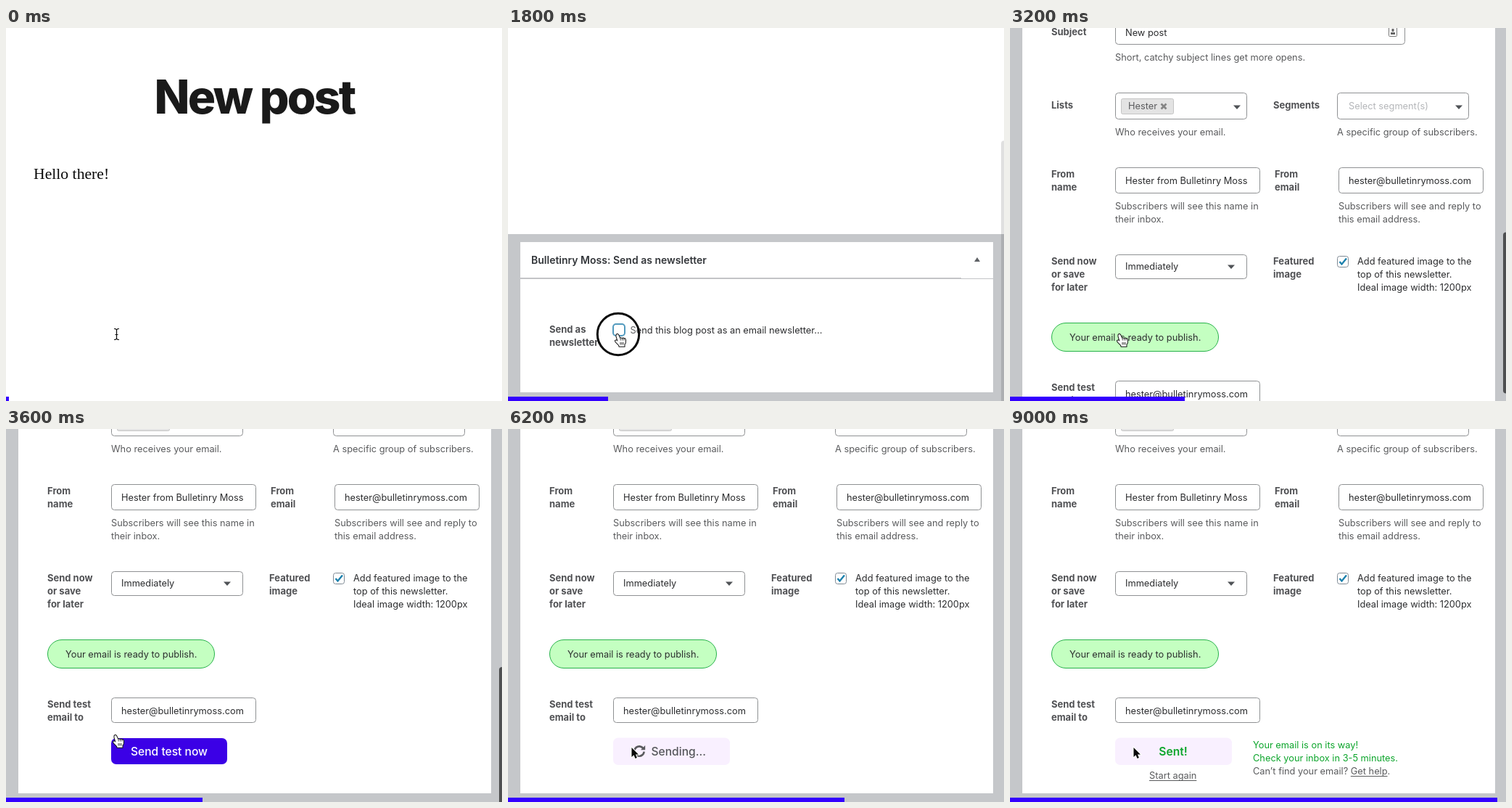
Animation of 684x514 px, one loop 9200 ms. Source, as an HTML page with a canvas:

```html
<!DOCTYPE html>
<html lang="en">
<head>
<meta charset="utf-8">
<title>Send as newsletter</title>
<style>
  html, body { margin: 0; width: 100%; height: 100%; overflow: hidden; background: #fff; }
  canvas { display: block; width: 684px; height: 514px; }
</style>
</head>
<body>
<canvas id="stage" width="684" height="514"></canvas>
<script>
const ctx = document.getElementById('stage').getContext('2d');
const W = 684, H = 514, LOOP = 9200, STEP = 200, END_SCROLL = 845;
const CHECKED_AT = 2000, SENDING_AT = 5000, SENT_AT = 7600;

const SANS = 'Inter, sans-serif';
const BODY = `400 12.8px ${SANS}`;
const LABEL = `700 13px ${SANS}`;
const BUTTON = `500 15.6px ${SANS}`;
const INK = '#2c2d2f', MUTED = '#5a5b5d', BORDER = '#8f9193', GREEN = '#0ca52b', BLUE = '#3b00e6';

const BRAND = 'Bulletinry Moss', SENDER = 'Hester', EMAIL = 'hester@bulletinrymoss.com';

const clamp = v => Math.max(0, Math.min(1, v));
const ramp = (t, from, to) => clamp((t - from) / (to - from));
const smooth = p => p * p * (3 - 2 * p);

function keyed(t, keys) {
  for (let i = 1; i < keys.length; i++) {
    const [t0, v0] = keys[i - 1], [t1, v1] = keys[i];
    if (t <= t1) return v0 + (v1 - v0) * ramp(t, t0, t1);
  }
  return keys[keys.length - 1][1];
}

function scrollAt(t) {
  if (t < CHECKED_AT) return Math.round(235 * smooth(ramp(t, 363, 1085)));
  return Math.round(keyed(t, [[2200, 235], [2400, 425], [2800, 575], [3500, END_SCROLL]]));
}

function text(str, x, y, color = INK, font = BODY, align = 'left') {
  ctx.font = font;
  ctx.fillStyle = color;
  ctx.textAlign = align;
  ctx.fillText(str, x, y);
}

function lines(list, x, y, color, font) {
  list.forEach((str, i) => text(str, x, y + i * 18, color, font));
}

const label = (list, x, y) => lines(list, x, y, '#505154', LABEL);
const hint = (list, x, y) => lines(list, x, y, MUTED);

function box(x, y, w, h, r, fill, stroke, line = 1) {
  ctx.beginPath();
  ctx.roundRect(x, y, w, h, r);
  if (fill) { ctx.fillStyle = fill; ctx.fill(); }
  if (stroke) { ctx.strokeStyle = stroke; ctx.lineWidth = line; ctx.stroke(); }
}

function shape(points, fill, stroke, line = 1) {
  ctx.beginPath();
  points.forEach(([x, y]) => ctx.lineTo(x, y));
  ctx.closePath();
  if (stroke) { ctx.strokeStyle = stroke; ctx.lineWidth = line; ctx.stroke(); }
  ctx.fillStyle = fill;
  ctx.fill();
}

function stroke(points, color, line) {
  ctx.beginPath();
  points.forEach(([x, y]) => ctx.lineTo(x, y));
  ctx.strokeStyle = color;
  ctx.lineWidth = line;
  ctx.stroke();
}

const field = (x, y, w, h) => box(x + .5, y + .5, w - 1, h - 1, 4, '#fff', BORDER);
const caret = (x, y) => shape([[x - 5, y - 2.5], [x + 5, y - 2.5], [x, y + 3]], '#505357');

function underlined(str, x, y) {
  text(str, x, y, MUTED);
  ctx.fillRect(x, y + 2, ctx.measureText(str).width, 1);
}

function checkbox(x, y, size, focused, checked) {
  const half = size / 2;
  box(x - half, y - half, size, size, focused ? 4 : 3, '#fff', focused ? '#1878a8' : '#7e8993', focused ? 2 : 1);
  if (checked) stroke([[x - 4.5, y], [x - 1.5, y + 3.5], [x + 5, y - 4.5]], '#1c81ad', 2.4);
}

function drawPost() {
  ctx.letterSpacing = '-2.66px';
  text('New post', 342.5, -727, '#1a1a1a', `800 64px ${SANS}`, 'center');
  ctx.letterSpacing = '0px';
  text('Hello there!', 38, -637, '#0a0a0a', '21.7px "Liberation Serif", serif');
}

function drawPanel(open) {
  ctx.fillStyle = '#c5c7ca';
  ctx.fillRect(0, -326, W, 1400);
  ctx.fillStyle = '#fff';
  ctx.fillRect(17, -315, 652, (open ? 502 : -108) + 315);
  text(`${BRAND}: Send as newsletter`, 32, -285, '#33363a', `600 14px ${SANS}`);
  shape([[643, -288], [651, -288], [647, -294]], '#5f6266');
  ctx.fillStyle = '#c3c4c7';
  ctx.fillRect(17, -265, 652, 1);
  ctx.fillRect(17, -266, 608, 1);
  label(['Send as', 'newsletter'], 57, -190);
  checkbox(153, -194, 16, true, open);
  text('Send this blog post as an email newsletter...', 168.5, -189);
}

function drawForm() {
  label(['Subject'], 57, -106);
  field(145, -128, 400, 35);
  text('New post', 159, -105);
  box(522.5, -117.5, 11, 13, 1, '#fff', '#777');
  ctx.fillStyle = '#666';
  ctx.fillRect(526.5, -115, 3, 4);
  ctx.fillRect(525, -110, 6, 3);
  hint(['Short, catchy subject lines get more opens.'], 145, -71);

  label(['Lists'], 57, -5);
  field(145, -27, 182, 37);
  box(153.5, -18.5, 72, 21, 2, '#e3e3e3', '#c4c4c4');
  text(SENDER, 163, -4, MUTED);
  stroke([[208.5, -11.5], [215.5, -4.5]], '#858585', 2.6);
  stroke([[215.5, -11.5], [208.5, -4.5]], '#858585', 2.6);
  caret(313, -7);
  hint(['Who receives your email.'], 145, 32);

  label(['Segments'], 363, -5);
  field(451, -27, 182, 37);
  text('Select segment(s)', 467, -4, '#b4b6b9');
  caret(619, -7);
  hint(['A specific group of subscribers.'], 451, 32);

  label(['From', 'name'], 57, 90);
  field(145, 76, 200, 36);
  text(`${SENDER} from ${BRAND}`, 159, 99);
  hint(['Subscribers will see this name in', 'their inbox.'], 145, 134);

  label(['From', 'email'], 365, 90);
  field(453, 76, 200, 36);
  text(EMAIL, 467, 99);
  hint(['Subscribers will see and reply to', 'this email address.'], 453, 134);

  label(['Send now', 'or save', 'for later'], 57, 210);
  field(145, 196, 182, 34);
  text('Immediately', 159, 217);
  caret(305, 213);

  label(['Featured', 'image'], 363, 210);
  checkbox(459, 206, 15, false, true);
  lines(['Add featured image to the', 'top of this newsletter.', 'Ideal image width: 1200px'], 479, 210);

  box(57.5, 290.5, 230, 39, 19.5, '#c4ffc1', '#27b24a');
  text('Your email is ready to publish.', 82, 315);

  label(['Send test', 'email to'], 57, 384);
  field(145, 370, 200, 35);
  text(EMAIL, 159, 393);
}

function drawSpinner(x, y, angle) {
  ctx.save();
  ctx.translate(x, y);
  ctx.rotate(angle);
  for (let i = 0; i < 2; i++) {
    ctx.beginPath();
    ctx.arc(0, 0, 6.7, Math.PI * 1.03, Math.PI * 1.8);
    ctx.strokeStyle = '#5a5a5e';
    ctx.lineWidth = 2.7;
    ctx.stroke();
    shape([[8.2, -8], [8.2, -1.8], [2, -1.8]], '#5a5a5e');
    ctx.rotate(Math.PI);
  }
  ctx.restore();
}

function drawButton(t) {
  if (t < SENDING_AT) {
    box(145, 426, 160, 36, 7, BLUE);
    text('Send test now', 225, 450, '#fff', BUTTON, 'center');
    return;
  }
  box(145, 425.5, 161, 37.5, 7, '#f9f0ff');
  if (t < SENT_AT) {
    drawSpinner(181, 444, (t - 6200) / 2000 * Math.PI * 2);
    text('Sending...', 197.5, 450, '#55565a', BUTTON);
    return;
  }
  text('Sent!', 225, 450, GREEN, `600 15.6px ${SANS}`, 'center');
  underlined('Start again', 192, 482);
  lines(['Your email is on its way!', 'Check your inbox in 3-5 minutes.'], 335, 440, GREEN);
  const question = 'Can’t find your email? ';
  text(question, 335, 476, MUTED);
  const linkX = 335 + ctx.measureText(question).width;
  underlined('Get help', linkX, 476);
  text('.', linkX + ctx.measureText('Get help').width, 476, MUTED);
}

function drawScrollbar(t, scroll, open) {
  const alpha = keyed(t, [[350, 0], [400, .6], [1400, .6], [1900, 0], [2150, 0], [2200, .6], [3900, .6], [4400, 0]]);
  if (!alpha) return;
  const top = open ? scroll * .4 - 10 : scroll * .716 - 13;
  box(680, top, 8, open ? 222 : 396, 4, `rgba(0,0,0,${alpha})`);
}

function drawRing(x, y) {
  ctx.beginPath();
  ctx.arc(x, y, 28.7, 0, Math.PI * 2);
  ctx.fillStyle = 'rgba(255,255,255,.25)';
  ctx.fill();
  ctx.strokeStyle = '#0a0a0a';
  ctx.lineWidth = 3;
  ctx.stroke();
}

function drawIBeam() {
  stroke([[149, 414.5], [151, 414.5], [152.5, 416], [154, 414.5], [156, 414.5]], '#111', 1.2);
  stroke([[149, 429.5], [151, 429.5], [152.5, 428], [154, 429.5], [156, 429.5]], '#111', 1.2);
  stroke([[152.5, 416], [152.5, 428]], '#111', 1.3);
  stroke([[150.5, 422.5], [154.5, 422.5]], '#111', 1);
}

function drawHand() {
  const outline = [[-2.5, 1], [-1.5, 0], [0, .5], [2.5, 6], [4, 5.3], [5.3, 6.2], [6.8, 5.4],
    [8, 6.4], [9.2, 6.1], [10, 8], [9.8, 12], [8.5, 14], [8.5, 16.8], [1.5, 16.8], [1, 15],
    [-3.5, 10.5], [-4, 9], [-2.8, 8.3], [-.5, 9.8], [-2.5, 3]];
  shape(outline, '#fff', '#111', 2);
  for (const x of [3, 5, 7]) stroke([[x, 11], [x, 14.5]], '#222', .9);
  for (const x of [3, 5.5, 7.8]) stroke([[x, 6], [x + .3, 8.5]], '#222', .9);
}

function drawArrow() {
  shape([[0, 0], [0, 13], [3, 10.3], [5, 15], [7.4, 14], [5.4, 9.4], [9.4, 9.4]], '#0a0a0a', '#fff', 2);
}

function drawPointer(t) {
  const move = smooth(ramp(t, 3800, 4300));
  const x = 152 + 18.5 * move, y = 422 + 17 * move;
  if ((t >= 1600 && t < CHECKED_AT) || (t >= 4400 && t < 4800)) drawRing(x, y);
  if (t < 1200) return drawIBeam();
  ctx.save();
  ctx.translate(x, y);
  if (t < SENDING_AT) drawHand();
  else drawArrow();
  ctx.restore();
}

function render(t) {
  const scroll = scrollAt(t), open = t >= CHECKED_AT;
  ctx.fillStyle = '#fff';
  ctx.fillRect(0, 0, W, H);
  ctx.save();
  ctx.translate(0, END_SCROLL - scroll);
  drawPost();
  drawPanel(open);
  if (open) {
    drawForm();
    drawButton(t);
  }
  ctx.restore();
  drawScrollbar(t, scroll, open);
  drawPointer(t);
  ctx.fillStyle = '#3300ff';
  ctx.fillRect(0, 508, Math.round(4 + t / STEP * 14.84), 6);
}

const start = performance.now();
function tick() {
  const t = (performance.now() - start) % LOOP;
  render(Math.floor(t / STEP) * STEP);
  requestAnimationFrame(tick);
}
tick();
</script>
</body>
</html>
```
